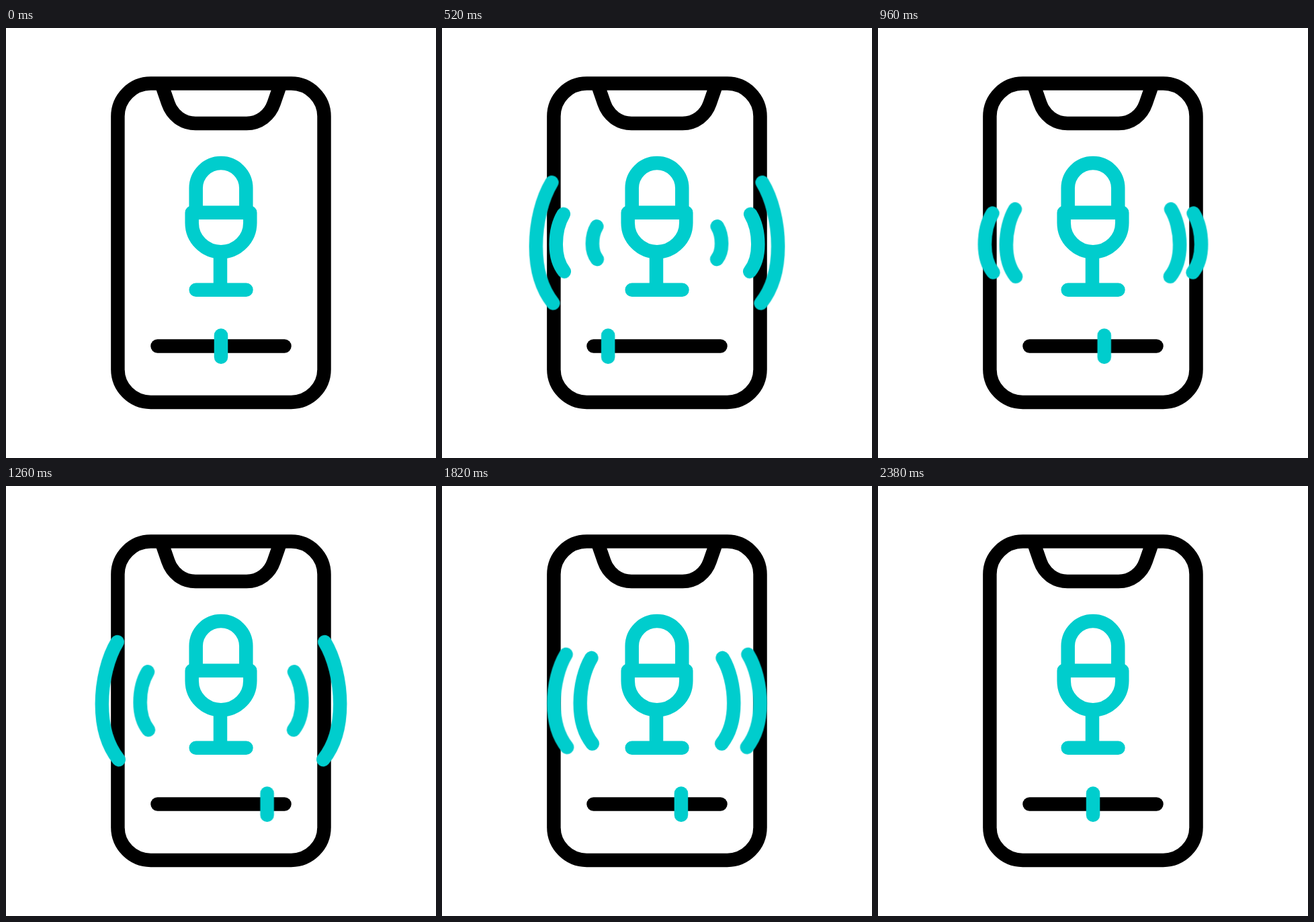
These frames come from a looping animation (640 px wide and 640 px high, 2.4 s). An HTML page:

```html
<!DOCTYPE html>
<html lang="en">
<head>
<meta charset="utf-8">
<title>Voice recorder</title>
<style>
  html, body { margin: 0; width: 100%; height: 100%; overflow: hidden; background: #fff; }
  svg { display: block; width: 640px; height: 640px; }
  path, rect { fill: none; stroke: #000; stroke-width: 20.5; stroke-linecap: round; stroke-linejoin: round; }
  .teal path, path.teal { stroke: #00cdcd; }
  .wave { opacity: 0; vector-effect: non-scaling-stroke; }
  #knob { animation: slide 2400ms infinite; }
  @keyframes slide {
    0% { transform: translateX(320px); animation-timing-function: cubic-bezier(.33, 0, .67, 1); }
    17% { transform: translateX(241px); animation-timing-function: cubic-bezier(.33, 0, .67, 1); }
    56% { transform: translateX(392px); animation-timing-function: cubic-bezier(.56, 0, .31, 1); }
    100% { transform: translateX(320px); }
  }
</style>
</head>
<body>
<svg width="640" height="640">
  <rect x="166.4" y="82.6" width="307.1" height="474.3" rx="49"/>
  <path d="M231.6 84L241.3 112C247.5 130 263 142 282 142H358C377 142 392.5 130 398.7 112L408.4 84"/>
  <path d="M225.5 473.5H414.5"/>
  <path id="knob" class="teal" d="M0 457.5V489.7"/>
  <g class="teal">
    <path d="M282.7 274V238.3A37.3 37.3 0 0 1 357.3 238.3V274"/>
    <path d="M276.7 274.7H363.3V290A43.3 43.3 0 0 1 276.7 290Z"/>
    <path d="M319 334V389.8M282.7 389.8H357.5"/>
  </g>
  <g id="left" class="teal"></g>
  <g id="right" class="teal" transform="translate(640 0) scale(-1 1)"></g>
</svg>
<script>
const LOOP = 2400;
const ARC = 'M23 -88C9 -65 0 -30 0 5C0 40 9 68 25 88';
const ARC_HEIGHT = 176;
const NEAR = 232, FAR = 137.5;

// Every wave drifts evenly from NEAR to FAR while its height grows
const waves = [
  { birth: 10, life: 524 },
  { birth: 178, life: 520, high: 111 },
  { birth: 466, life: 640, low: 44, high: 101 },
  { birth: 704, life: 590 },
  { birth: 1067, life: 567 },
  { birth: 1317, life: 727 },
  { birth: 1676, life: 520, low: 106 }
];

function addWave(side, { birth, life, low = 36, high = 183.5 }) {
  const arc = document.createElementNS('http://www.w3.org/2000/svg', 'path');
  arc.setAttribute('class', 'wave');
  arc.setAttribute('d', ARC);
  side.append(arc);

  const pose = (time, x, height, opacity) => ({
    offset: time / LOOP,
    opacity,
    transform: `translate(${x}px, 319.7px) scale(${height / ARC_HEIGHT})`
  });
  const death = birth + life;
  arc.animate([
    pose(0, NEAR, low, 0),
    pose(birth, NEAR, low, 0),
    pose(birth, NEAR, low, 1),
    pose(death, FAR, high, 1),
    pose(death, FAR, high, 0),
    pose(LOOP, FAR, high, 0)
  ], { duration: LOOP, iterations: Infinity });
}

for (const id of ['left', 'right']) {
  const side = document.getElementById(id);
  waves.forEach(wave => addWave(side, wave));
}

// Keep all parts on one clock
document.getAnimations().forEach(a => { a.startTime = 0; });
</script>
</body>
</html>
```
